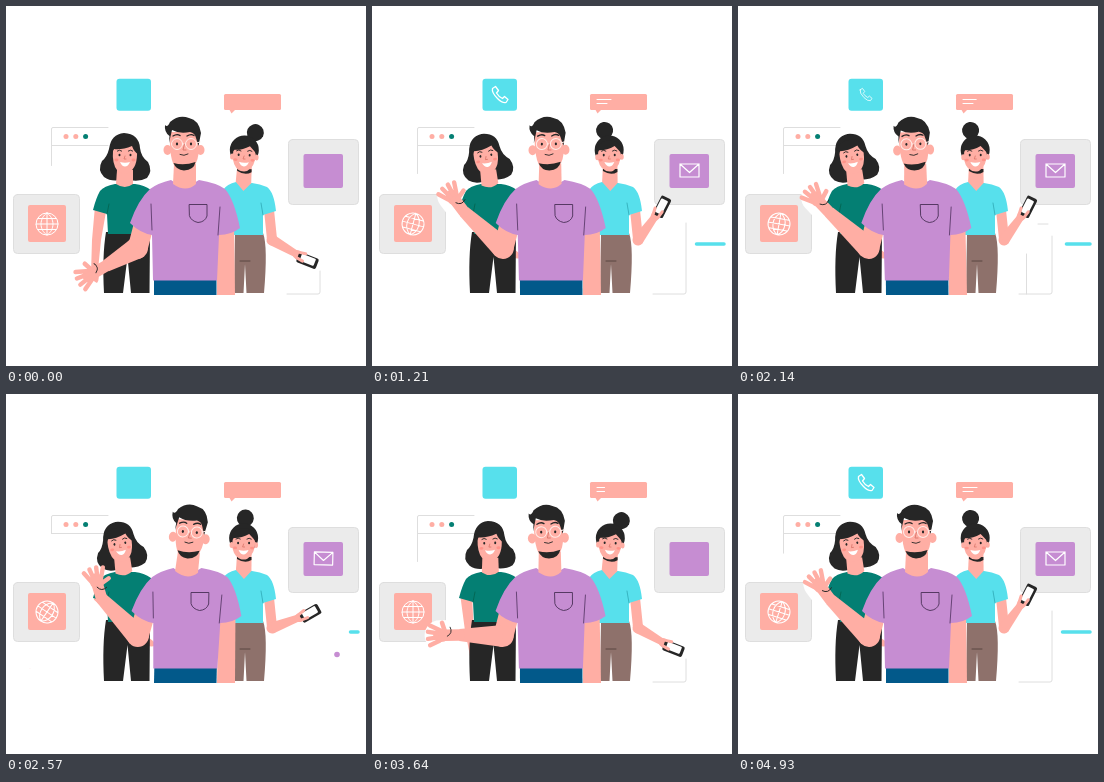
Write an HTML page with a canvas that moves like this. It is 360x360 px and loops after 5 s.

```html
<!DOCTYPE html>
<html lang="en">
<head>
<meta charset="utf-8">
<title>Contact team</title>
<style>
html, body { margin: 0; width: 100%; height: 100%; overflow: hidden; background: #fff; }
canvas { display: block; }
</style>
</head>
<body>
<canvas id="stage"></canvas>
<script>
const ctx = document.getElementById('stage').getContext('2d');
const LOOP = 5000, STEPS = 70, CYCLE = 3850;
const CORAL = '#ffaea4', SKIN = CORAL, BLUSH = '#ff9389', LINE = '#d9756a', DARK = '#262626',
  PURPLE = '#c68dd2', TEAL = '#047f73', CYAN = '#57e0ec', BROWN = '#8e716b', NAVY = '#02598a',
  GREY = '#ebebeb', EDGE = '#dedede', WHITE = '#fff';
const start = performance.now();
let time = 0; // ms within the movement cycle

// Eased 0..1 between two times, a rise and fall, and a track through [time, value] points.
function ramp(from, to) {
  const u = Math.min(1, Math.max(0, (time - from) / (to - from)));
  return u * u * (3 - 2 * u);
}
const pulse = (a, b, c, d) => ramp(a, b) - ramp(c, d);
const through = (...points) => points.reduce((value, [t, to], i) => {
  if (!i) return to;
  const [before, from] = points[i - 1];
  return value + (to - from) * ramp(before, t);
}, 0);

function fill(d, color) {
  ctx.fillStyle = color;
  ctx.fill(new Path2D(d));
}
function line(d, color, width = 1) {
  ctx.strokeStyle = color;
  ctx.lineWidth = width;
  ctx.stroke(new Path2D(d));
}
function oval(x, y, rx, ry, color) {
  ctx.beginPath();
  ctx.ellipse(x, y, rx, ry, 0, 0, 7);
  ctx.fillStyle = color;
  ctx.fill();
}
function box(x, y, w, h, r, color, edge) {
  ctx.beginPath();
  ctx.roundRect(x, y, w, h, r);
  ctx.fillStyle = color;
  ctx.fill();
  if (edge) {
    ctx.strokeStyle = edge;
    ctx.lineWidth = 1;
    ctx.stroke();
  }
}
function at(x, y, deg, scale, draw) {
  ctx.save();
  ctx.translate(x, y);
  ctx.rotate(deg * Math.PI / 180);
  ctx.scale(scale, scale);
  draw();
  ctx.restore();
}
function turn(x, y, deg, draw) {
  at(x, y, deg, 1, () => { ctx.translate(-x, -y); draw(); });
}
function bar(x1, x2, y, color, width) {
  if (x2 - x1 > 0.5) line(`M${x1} ${y}H${x2}`, color, width);
}

function browserWindow(sway) {
  const low = 139.5 + Math.min(28, Math.max(0, 20 - 80 * sway));
  line(`M102 121.5H47Q45.5 121.5 45.5 123V${low}M45.5 139.5H102`, EDGE);
  [CORAL, CORAL, TEAL].forEach((c, i) => oval(60 + i * 9.8, 130.5, 2.5, 2.5, c));
}

function page() {
  const height = 23 + 48 * pulse(600, 1000, 1900, 2400) - 23 * pulse(2300, 2500, 2700, 3000);
  if (height > 3) line(`M281 288H312Q314 288 314 286V${288 - height}`, EDGE);
  const side = 55 * pulse(1300, 1700, 1900, 2400);
  bar(300, 300 + side / 4, 218, EDGE, 1);
  if (side > 1) line(`M288.5 288V${288 - side}`, EDGE);
}

function icons() {
  box(7.5, 188.5, 66, 59, 4, GREY, EDGE);
  box(22, 199, 38, 37, 2, CORAL);
  const spin = 30 * pulse(0, 360, 500, 1790) + 35 * pulse(1800, 2570, 2600, 3500);
  at(41, 218, spin, 1, () => line(
    'M-11 0A11 11 0 1 1 11 0A11 11 0 1 1 -11 0H11M0-11V11' +
    'M0-11C-8-6-8 6 0 11C8 6 8-6 0-11M-9-5.5H9M-9 5.5H9', WHITE, 1));

  box(282.5, 133.5, 70, 65, 4, GREY, EDGE);
  box(297.5, 148, 39.5, 34, 2, PURPLE);
  const mail = pulse(0, 400, 2450, 3000);
  at(317.5, 164.5, (1 - mail) * (time < 1500 ? -60 : 60), mail,
    () => line('M-9.5-6.5H9.5V6.5H-9.5ZL0 2L9.5-6.5', WHITE, 1.2));

  box(110.5, 72.8, 34.5, 32, 3, CYAN);
  const call = pulse(-200, 900, 1900, 2450) * ramp(0, 250);
  ctx.globalAlpha = call;
  at(127.5, 88.5, 0, call, () => line(
    'M-7-6L-4-8L-1-4L-3-1.5Q-1 2 3 4L5 2L8.5 5L6.5 8Q3 9-2 4Q-8-2-7-6Z', WHITE, 1.3));
  ctx.globalAlpha = 1;
}

function bubble() {
  box(218, 88, 57, 16, 1.5, CORAL);
  fill('M223 103H230L225.5 107.5Z', CORAL);
  const text = 14 * pulse(200, 600, 2000, 2500) + 31 * pulse(2700, 3000, 3300, 3700);
  bar(225, 225 + text, 93.5, WHITE, 1);
  bar(225, 225 + Math.min(text, 10), 97.5, WHITE, 1);
}

function confetti() {
  bar(324.5 + 20 * pulse(1900, 2500, 2600, 3000), 322 + 30 * pulse(380, 560, 2600, 3200), 238, CYAN, 3.5);
  bar(12.5 + 36 * ramp(620, 900), 10 + 36 * ramp(380, 560), 104, PURPLE, 3.5);
  const violet = 2.8 * (pulse(150, 300, 600, 900) + pulse(2200, 2400, 2700, 2900));
  const rose = 2.5 * pulse(2400, 2950, 3200, 3600);
  oval(331, 260.5, violet, violet, PURPLE);
  oval(24, 274.5, rose, rose, CORAL);
}

function face(x, y) {
  for (const s of [-1, 1]) {
    oval(x + s * 5.5, y, 1, 1.3, DARK);
    line(`M${x + s * 5.5 - 2.2} ${y - 4}q2.2-1.8 4.4 0`, DARK, 0.9);
    oval(x + s * 8.5, y + 5, 2, 1.4, BLUSH);
  }
  line(`M${x} ${y + 1}l-1 3h2`, LINE, 0.8);
  fill(`M${x - 5} ${y + 7}Q${x} ${y + 8.5} ${x + 5} ${y + 7}Q${x + 3} ${y + 11.5} ${x} ${y + 11.5}Q${x - 3} ${y + 11.5} ${x - 5} ${y + 7}Z`, WHITE);
}

function leftWoman() {
  const lean = pulse(650, 950, 3300, 3700);
  turn(94, 204, -52 * lean, () =>
    fill('M89 200H101L95 234L92 264Q94 274 91 277Q86 275 85 268L86 234Z', SKIN));
  fill('M100 226H144L143.5 287H125L121.5 251L117 287H98Q96 250 100 226Z', DARK);
  fill('M109 178Q98 180 94 185Q90 192 87 204L101 208L102 228H145V184Q138 179 129 178Z', TEAL);
  line('M101 208L103 198', '#04624f', 0.8);
  turn(120, 182, -9 * lean, () => {
    fill('M118 127Q105 128 103 143Q101 151 96 155Q91 164 98 171Q106 177 119 173Q132 177 141 172Q147 165 142 156Q135 151 134 142Q133 128 118 127Z', DARK);
    fill('M111 164H127V178Q119 184 110 178Z', SKIN);
    fill('M107 144Q109 138 118 138Q130 138 131 144Q132 162 122 167Q116 169 111 164Q106 158 107 144Z', SKIN);
    fill('M105 149Q104 133 118 133Q133 133 133 149Q128 146 126 140Q116 144 108 143Z', DARK);
    face(119, 149);
  });
}

function rightWoman() {
  const lift = pulse(0, 880, 2200, 2900);
  fill('M229 227H257Q262 240 258 287H240.5L239 258L237.5 287H228Z', BROWN);
  line('M234 255H244', '#4d3a36', 0.8);
  line('M263 204L266 233', SKIN, 10);
  at(266, 234, 30 - 84 * lift, 1, () => {
    oval(0, 0, 5.5, 5.5, SKIN);
    fill('M0-5.5L28-3.5V3.5L0 5.5Z', SKIN);
    oval(30, 0, 6, 4.5, SKIN);
    at(41, 0, -9, 1, () => {
      box(-10.5, -5.5, 21, 11, 2, DARK);
      box(-7.5, -4.5, 15, 7.5, 1, WHITE);
    });
    line('M30 3L37 3M30-3L36-5', SKIN, 3);
  });
  fill('M230 176Q221 178 217 184V229H257L257 209L270 205Q268 186 261 181Q254 178 246 177Z', CYAN);
  line('M257 209L255 197', '#2fa9b5', 0.8);

  const bun = 25 - 35 * lift;
  at(237.5, 152, bun, 1, () => oval(0, -28, 8.5, 8.5, DARK));
  turn(238, 168, bun * 0.08, () => {
    fill('M231 160H245.5V177L238 185L230 176Z', SKIN);
    oval(237.5, 144, 14.5, 14.5, DARK);
    oval(225.5, 151, 2, 3, SKIN);
    oval(250, 151, 2, 3, SKIN);
    fill('M231 163H245.5V166Q239 170 231 165Z', DARK);
    fill('M226.5 146Q229 138 238 138Q248 138 249 148Q249 160 241 165Q235 167 230 162Q225 156 226.5 146Z', SKIN);
    fill('M224 149Q225 135 238 134Q250 135 251 149Q247 144 243 140Q234 145 226 144Z', DARK);
    face(237.5, 149);
  });
}

function wavePose() {
  const raise = pulse(0, 340, 3300, 3800);
  const wave = through([0, 0], [360, 10], [570, -28], [1080, 10], [1790, -6], [2570, 28], [3070, -6], [CYCLE, 0]);
  return { forearm: 72 * raise - 30 + wave * 0.12, reach: 36 + 17 * raise, bend: wave };
}

function wavingArm({ forearm, reach, bend }) {
  line('M138 218L132 241', SKIN, 20);
  at(131, 242, 180 + forearm, 1, () => {
    oval(0, 0, 11, 11, SKIN);
    fill(`M0-11L${reach}-6V6L0 11Z`, SKIN);
    at(reach, 0, bend, 1, () => {
      line('M0 0H14', SKIN, 11.5);
      oval(18, 0, 8, 6.8, SKIN);
      for (let i = 0; i < 4; i++)
        at(18, 3 * i - 4.5, 17 * i - 25, 1, () => line(`M2 0H${14 - Math.abs(i - 1.5)}`, SKIN, 4.4));
      at(14, 3, 72, 1, () => line('M0 0H10', SKIN, 4.5));
      line('M9 8Q6 2 12-1', DARK, 0.9);
    });
  });
}

// White space left around the waving arm where it meets the cards.
function armGap({ forearm, reach, bend }) {
  at(131, 242, 180 + forearm, 1, () => {
    line(`M0 0H${reach}`, WHITE, 30);
    at(reach, 0, bend, 1, () => line('M0 0H20', WHITE, 30));
  });
}

function manHead() {
  fill('M168 158H190V178Q180 187 167 178Z', SKIN);
  for (const x of [161.5, 194.5]) oval(x, 144, 4, 5, SKIN);
  fill('M164 126H192.5V148Q191 160 184 163Q174 166 168 159Q163 150 164 126Z', SKIN);
  fill('M163 137L163.5 130Q158 126 159 119Q161.5 122 164 116Q173 108 183 112Q193 114 195 127L192.5 140L190 132Q189 127 184 126Q173 128 166 124Z', DARK);
  fill('M167.5 157Q178 160 189.5 156Q188 164 178 164.5Q170 164 167.5 157Z', DARK);
  for (const x of [171, 185]) {
    line(`M${x - 5.5} 138a5.5 5.5 0 1 1 11 0a5.5 5.5 0 1 1 -11 0`, '#ffece8');
    oval(x, 138, 1.1, 1.4, DARK);
    line(`M${x - 4} 130q4-2.5 7-.5`, DARK, 1.4);
  }
  line('M176.5 138H179.5M190.5 137L194 136', '#ffece8');
  line('M178.5 138L177 144H180', LINE, 0.9);
  line('M174 148.5Q178 150.5 182 148', DARK, 0.9);
}

function man(sway, arm) {
  ctx.save();
  ctx.transform(1, 0, -0.022 * sway, 1, 289 * 0.022 * sway, 0);
  fill('M211 218H228L229 289H211Z', SKIN);
  wavingArm(arm);
  fill('M148 272H210.5V289H148Z', NAVY);
  fill('M165 174Q178 184 193 174Q211 177 219 183Q228 193 234 222Q225 229 213 229L211 274.5H147L146 229Q134 227 124 217Q132 194 144 183Q152 177 165 174Z', PURPLE);
  line('M145 198L146 224M214 201L212 229', '#5d3c6b', 0.9);
  line('M183.5 198.5H201V210Q199 216 192 216.5Q185 215 183.5 210Z', '#4a3057', 0.9);
  turn(179, 174, 4.5 * sway, manHead);
  ctx.restore();
}

function fitStage() {
  const side = Math.min(innerWidth, innerHeight), size = Math.round(side * (devicePixelRatio || 1));
  if (ctx.canvas.width !== size) {
    ctx.canvas.width = ctx.canvas.height = size;
    ctx.canvas.style.width = ctx.canvas.style.height = side + 'px';
  }
  ctx.setTransform(size / 360, 0, 0, size / 360, 0, 0);
  ctx.lineCap = ctx.lineJoin = 'round';
}

function frame() {
  const progress = (performance.now() - start) % LOOP / LOOP;
  time = Math.floor(progress * STEPS) * LOOP / STEPS % CYCLE;
  const sway = through([0, 0], [360, 0], [570, 1], [1590, -1], [1800, -1], [2570, 1], [3070, -1], [CYCLE, 0]);
  const arm = wavePose();

  fitStage();
  ctx.fillStyle = WHITE;
  ctx.fillRect(0, 0, 360, 360);
  browserWindow(sway);
  page();
  icons();
  bubble();
  confetti();
  armGap(arm);
  leftWoman();
  rightWoman();
  man(sway, arm);
  requestAnimationFrame(frame);
}
frame();
</script>
</body>
</html>
```
